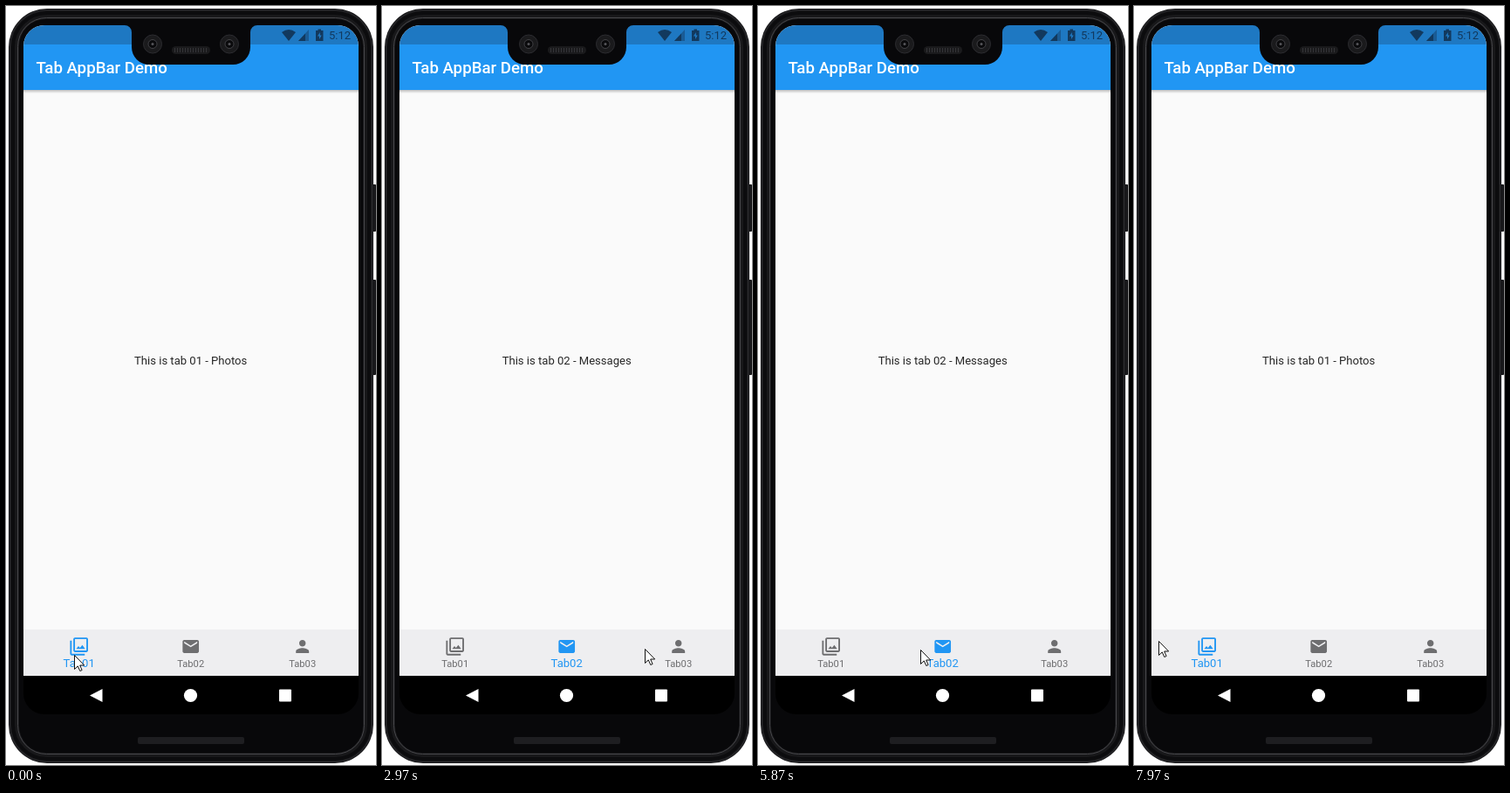
An HTML page for the animation above (8 s loop, 424x868 px).

```html
<!DOCTYPE html>
<html lang="en">
<head>
<meta charset="utf-8">
<title>Tab AppBar Demo</title>
<style>
  html, body { margin: 0; width: 100%; height: 100%; overflow: hidden; background: #fff; }
  svg { display: block; width: 424px; height: 868px; font-family: Roboto, sans-serif; }
</style>
</head>
<body>
<svg viewBox="0 0 424 868">
  <defs>
    <clipPath id="screen"><rect x="20" y="22" width="384" height="788" rx="24"/></clipPath>
    <linearGradient id="shadow" x2="0" y2="1">
      <stop stop-opacity=".24"/>
      <stop offset="1" stop-opacity="0"/>
    </linearGradient>
  </defs>

  <!-- Phone body -->
  <g fill="#18181a">
    <rect x="418" y="204" width="6" height="54" rx="1"/>
    <rect x="418" y="313" width="6" height="109" rx="1"/>
    <rect x="3" y="3" width="418" height="863" rx="44"/>
  </g>
  <g fill="none">
    <rect x="4.5" y="4.5" width="415" height="860" rx="42.5" stroke="#2c2c2f"/>
    <rect x="8" y="8" width="408" height="853" rx="39" stroke="#0c0c0e" stroke-width="4"/>
    <rect x="13.5" y="13.5" width="397" height="842" rx="33" stroke="#46464a"/>
  </g>
  <rect x="15" y="15" width="394" height="839" rx="31" fill="#08080a"/>
  <rect x="151" y="836" width="122" height="8" rx="2" fill="#1e1e21"/>

  <!-- Screen -->
  <g clip-path="url(#screen)">
    <rect x="20" y="22" width="384" height="744" fill="#fafafa"/>
    <rect x="20" y="96" width="384" height="4" fill="url(#shadow)"/>
    <rect x="20" y="44" width="384" height="52" fill="#2196f3"/>
    <rect x="20" y="22" width="384" height="22" fill="#1e78c2"/>
    <text x="34.5" y="77" font-size="18.7" font-weight="500" fill="#fff">Tab AppBar Demo</text>
    <g fill="#12395e">
      <path d="M316 30Q324 24 332 30L324 40Z"/>
      <path d="M347 27V40H335Z" opacity=".45"/>
      <path d="M343 31.500V40H335Z"/>
      <path d="M355 28H357.500V26.500H361V28H363.500V40H355ZM359.800 30L357 34.500H359V38L361.700 33.500H359.800Z" fill-rule="evenodd"/>
      <text x="370" y="38.300" font-size="13">5:12</text>
    </g>
    <text id="message" x="211.7" y="410" font-size="13.07" text-anchor="middle" fill="#262626"></text>

    <rect x="20" y="713" width="384" height="53" fill="#eeeef0"/>
    <circle id="ripple" cy="740" fill="#808080"/>
    <g id="tabs"></g>

    <rect x="20" y="766" width="384" height="44"/>
    <g fill="#fff">
      <path d="M96 788.500L110.500 781V796Z"/>
      <circle cx="211.500" cy="788.500" r="7.600"/>
      <rect x="313" y="781.500" width="14" height="14" rx="1"/>
    </g>
  </g>

  <!-- Notch -->
  <path d="M134 20V22H136A8 8 0 0 1 144 30V47A20 20 0 0 0 164 67H260A20 20 0 0 0 280 47V30A8 8 0 0 1 288 22H290V20Z" fill="#08080a"/>
  <g id="cameras"></g>
  <rect x="190" y="46" width="44" height="9" rx="4.500" fill="#1a1a1c"/>
  <path d="M193 50.500H231" stroke="#343438" stroke-width="5" stroke-dasharray="1 2"/>

  <path id="cursor" d="M.5 .5V16.500L4.300 12.900L6.800 18.500L9.100 17.500L6.700 12H11.700Z" fill="#fff" stroke="#111"/>
</svg>

<script>
const LOOP = 8000, FADE = 200, RIPPLE = 200;
const GREY = [110, 110, 112], BLUE = [33, 150, 243];
const messages = ['This is tab 01 - Photos', 'This is tab 02 - Messages', 'This is tab 03 - Profile'];
const icons = [
  'M15.96 10.29l-2.75 3.54-1.96-2.36L8.5 15h11l-3.54-4.71zM3 5H1v16c0 1.1.9 2 2 2h16v-2H3V5zm18-4H7c-1.1 0-2 .9-2 2v14c0 1.1.9 2 2 2h14c1.1 0 2-.9 2-2V3c0-1.1-.9-2-2-2zm0 16H7V3h14v14z',
  'M20 4H4c-1.1 0-2 .9-2 2v12c0 1.1.9 2 2 2h16c1.1 0 2-.9 2-2V6c0-1.1-.9-2-2-2zm0 4l-8 5-8-5V6l8 5 8-5v2z',
  'M12 12c2.21 0 4-1.79 4-4s-1.79-4-4-4-4 1.79-4 4 1.79 4 4 4zm0 2c-2.67 0-8 1.34-8 4v2h16v-2c0-2.66-5.33-4-8-4z'
];

// The page text switches first, the bar animation follows.
const taps = [
  { tab: 0, page: 880, bar: 880 },
  { tab: 1, page: 2270, bar: 2320 },
  { tab: 2, page: 3270, bar: 3550 },
  { tab: 1, page: 5200, bar: 5410 },
  { tab: 0, page: 6870, bar: 7000 }
];

// Pointer path: time, x, y
const path = [
  [0, 78, 742], [1100, 78, 742], [1730, 170, 734], [1830, 191, 739], [1930, 219, 741],
  [2470, 219, 741], [2970, 301, 735], [3070, 323, 737], [3240, 338, 740],
  [4340, 338, 740], [5130, 213, 737],
  [5620, 213, 737], [6230, 121, 733], [6600, 88, 724], [6770, 91, 728],
  [7200, 91, 728], [7570, 69, 731], [7640, 69, 731], [7820, 45, 721], [7970, 28, 726], [LOOP, 28, 726]
];

const $ = id => document.getElementById(id);
const clamp = v => Math.min(1, Math.max(0, v));
const mix = (a, b, k) => a + (b - a) * k;
const smooth = k => k * k * (3 - 2 * k);
const tabX = i => 83.7 + 128 * i;

$('cameras').innerHTML = [168, 256].map(x => `
  <circle cx="${x}" cy="43.500" r="10.500" fill="#1a1a1c" stroke="#2c2c30"/>
  <circle cx="${x}" cy="43.500" r="5" fill="#0a0a0c" stroke="#424246"/>
  <circle cx="${x}" cy="43.500" r="1.500" fill="#55555a"/>`).join('');

$('tabs').innerHTML = icons.map((d, i) => `<g>
  <path d="${d}" transform="translate(${tabX(i) - 11.2} 721.200) scale(.934)"/>
  <text x="${tabX(i)}" y="756" text-anchor="middle">Tab0${i + 1}</text></g>`).join('');
const tabs = [...$('tabs').children];

// Monotone cubic through the path: the pointer eases in and out of every rest.
function slope(i, axis) {
  const a = path[i], b = path[i + 1];
  return a && b ? (b[axis] - a[axis]) / (b[0] - a[0]) : 0;
}

function tangent(i, axis) {
  const before = slope(i - 1, axis), after = slope(i, axis);
  return before * after > 0 ? 2 * before * after / (before + after) : 0;
}

function pointerAt(t) {
  const i = path.findIndex(p => p[0] > t) - 1;
  const [a, b] = [path[i], path[i + 1]];
  const span = b[0] - a[0], k = (t - a[0]) / span;
  return [1, 2].map(axis => mix(a[axis], b[axis], smooth(k))
    + span * k * (1 - k) * (tangent(i, axis) * (1 - k) - tangent(i + 1, axis) * k));
}

function draw(t) {
  const page = taps.filter(tap => tap.page <= t).pop();
  const index = taps.filter(tap => tap.bar <= t).length - 1;
  const current = taps[index] || { tab: 0, bar: -LOOP };
  const previous = index > 0 ? taps[index - 1].tab : 0;
  const age = t - current.bar;
  const k = smooth(clamp(age / FADE));

  $('message').textContent = messages[page ? page.tab : 0];

  tabs.forEach((tab, i) => {
    const active = (i === current.tab ? k : 0) + (i === previous ? 1 - k : 0);
    tab.setAttribute('fill', `rgb(${GREY.map((c, n) => Math.round(mix(c, BLUE[n], active)))})`);
    tab.lastElementChild.setAttribute('font-size', mix(11.2, 13.07, active));
  });

  const spread = clamp(age / RIPPLE);
  $('ripple').setAttribute('cx', tabX(current.tab));
  $('ripple').setAttribute('r', mix(10, 35, Math.sqrt(spread)));
  $('ripple').setAttribute('opacity', .25 * (1 - spread));

  $('cursor').setAttribute('transform', `translate(${pointerAt(t).map(Math.round)})`);
}

function frame() {
  draw(performance.now() % LOOP);
  requestAnimationFrame(frame);
}
frame();
</script>
</body>
</html>
```
